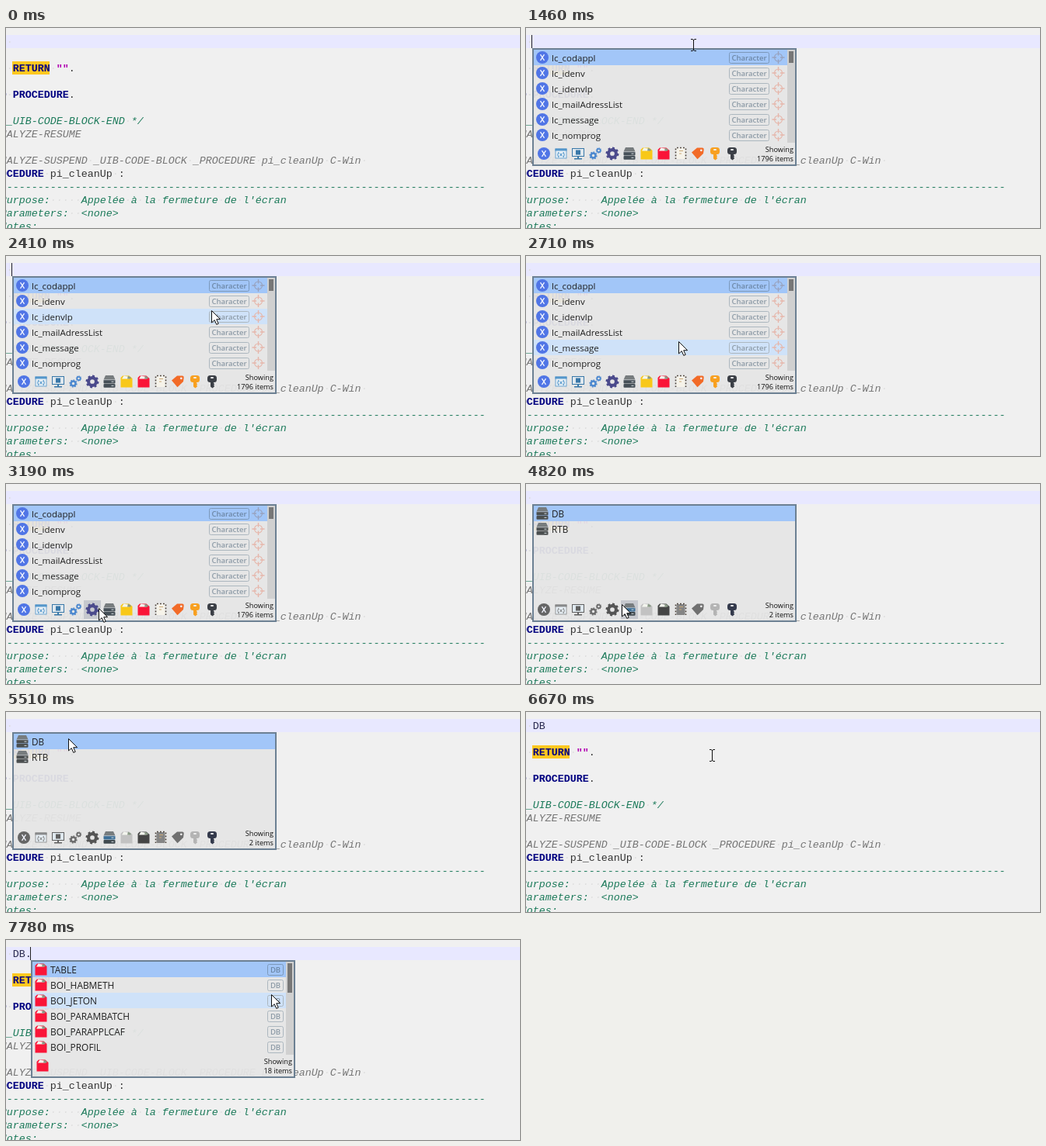
These frames come from a looping animation (661x258 px, 8 s). An HTML page:

```html
<!DOCTYPE html>
<html lang="fr">
<head>
<meta charset="utf-8">
<title>Code completion</title>
<style>
  html, body { margin: 0; width: 100%; height: 100%; overflow: hidden; background: #f0f0f0; }
  svg { display: block; }
  text { white-space: pre; }
  .code { font: 13.333px "Liberation Mono", monospace; fill: #333; }
  .key { font-weight: bold; fill: #000080; }
  .str { font-weight: bold; fill: #b000b0; }
  .com { font-style: italic; fill: #1c7a5a; }
  .pre { font-style: italic; fill: #757575; }
  .dot { fill: #dedede; }
  .item { font-family: "Open Sans", sans-serif; fill: #202020; }
  .count { font: 9.2px "Open Sans", sans-serif; fill: #101010; text-anchor: end; }
  .badge { font: 600 9.5px "Open Sans", sans-serif; fill: #8c9aa6; text-anchor: middle; }
</style>
</head>
<body>
<svg id="stage" width="661" height="258" viewBox="0 0 661 258"></svg>
<script>
const LOOP = 8000;
const stage = document.getElementById('stage');

const rect = (x, y, w, h, fill, more = '') =>
  `<rect x="${x}" y="${y}" width="${w}" height="${h}" fill="${fill}" ${more}/>`;
const path = (d, fill, more = '') => `<path d="${d}" fill="${fill}" ${more}/>`;
const line = (d, color, width = 1, more = '') =>
  path(d, 'none', `stroke="${color}" stroke-width="${width}" ${more}`);
const disc = (r, fill, more = '') => `<circle r="${r}" fill="${fill}" ${more}/>`;
const at = (x, y, body, more = '') => `<g transform="translate(${x} ${y})" ${more}>${body}</g>`;

// Editor: column 0 sits left of the stage
const dots = s => s.replace(/ /g, '<tspan class="dot">·</tspan>');
const code = (row, ...runs) => `<text class="code" x="-23.3" y="${22 + 17 * row}">` +
  runs.map(([cls, s]) => `<tspan class="${cls}">${dots(s)}</tspan>`).join('') + '</text>';

const editor =
  rect(0, 9, 661, 17, '#e8e8ff') +
  rect(8, 43, 48, 17, '#ffc820') +
  code(0, ['', '    ']) +
  code(2, ['', '    '], ['key', 'RETURN'], ['', ' '], ['str', '""'], ['', '.']) +
  code(4, ['key', 'END PROCEDURE'], ['', '.']) +
  code(6, ['com', '/* _UIB-CODE-BLOCK-END */']) +
  code(7, ['pre', '&amp;ANALYZE-RESUME']) +
  code(9, ['pre', '&amp;ANALYZE-SUSPEND _UIB-CODE-BLOCK _PROCEDURE pi_cleanUp C-Win ']) +
  code(10, ['key', 'PROCEDURE'], ['', ' pi_cleanUp :']) +
  code(11, ['com', '/*' + '-'.repeat(78)]) +
  code(12, ['com', "  Purpose:     Appelée à la fermeture de l'écran"]) +
  code(13, ['com', '  Parameters:  &lt;none&gt;']) +
  code(14, ['com', '  Notes:']);

// Icons, centred on 0,0; c is the main colour
const gear = (r, c) =>
  `<circle r="${r * .6}" fill="none" stroke="${c}" stroke-width="${r * .5}"/>` +
  `<circle r="${r * .88}" fill="none" stroke="${c}" stroke-width="${r * .3}" pathLength="16" stroke-dasharray="1"/>`;
const icon = {
  variable: c => disc(8, c) + line('M-2.5-3.8L2.5 3.8M2.5-3.8L-2.5 3.8', '#f4f6ff', 1.3),
  field: c => rect(-7, -6, 14, 12, '#e8f0f6', `stroke="${c}" stroke-opacity=".7"`) +
    rect(-7.5, -6.5, 15, 3, c, 'fill-opacity=".8"') +
    line('M-3-2Q-5.5 1.5-3 5M3-2Q5.5 1.5 3 5M-1.8-.5L1.8 3.5M1.8-.5L-1.8 3.5', c),
  screen: c => rect(-7.5, -6.5, 15, 10, '#dfe8ee', `stroke="${c}"`) +
    rect(-3, -4.5, 6, 6, c) + path('M-1 4H1V6H5V7.5H-5V6H-1Z', c),
  gears: c => at(-2.5, 2.5, gear(5, c)) + at(4.5, -4, gear(3.6, c)),
  gear: c => gear(8.2, c),
  drive: (c, mid = c) => path('M-5-8H5L7.5-2.5H-7.5Z', '#777c7e') + rect(-7.5, -2.2, 15, 4.6, mid, 'rx="1"') +
    rect(-7.5, 3, 15, 4.8, c, 'rx="1"') + line('M2.5 .2H5.5M2.5 5.4H5.5', '#d5dde0') +
    line('M-7-2.2H7', '#c9cfd1', .6),
  table: c => path('M-7.5-5L-5-7.5H3.5L7.5-4V7.5H-7.5Z', c) + path('M-3.5-7.5L4-6L3.5-3.5H-6Z', '#f3f5ee') +
    path('M2-7.5L6-5L5-3.5H1Z', '#8a9a86'),
  chip: c => rect(-5.5, -7, 11, 14, c, 'rx="1.5"') +
    line('M-6.5-6.5V7M6.5-6.5V7M-5-7.5H6', '#4a4038', 1.6, 'stroke-dasharray="1.8 2.2"') +
    line('M-2-3.5H3M-2 0H1', '#c9a878'),
  tag: c => path('M-8-1.5L-1-7.5H6Q8-7.5 7.7-5L7 0L-.5 7.2Z', c) +
    `<circle cx="4.3" cy="-4.2" r="1.4" fill="#f0f0f0"/>`,
  key: c => rect(-6, -8, 12, 9, c, 'rx="3.5"') + rect(-2, -6, 4, 2, '#eee', 'rx="1"') +
    path('M-2 0H2V2L3.2 3.3L2 4.5L3.2 6L.5 8.5L-2 6.5Z', c),
};
const target = c => disc(5, 'none', `stroke="${c}" stroke-width="1.1"`) +
  line('M0-8V-2.5M0 2.5V8M-8 0H-2.5M2.5 0H8', c, 1.4);

const tools = ['variable', 'field', 'screen', 'gears', 'gear', 'drive', 'table', 'table', 'chip', 'tag', 'key', 'key'];
const bright = ['#5075e6', '#3a87c4', '#3877a8', '#4c88cf', '#4b4a8c', '#465058', '#f8c818', '#fa1538', '#f6f3ea', '#f26b28', '#f8a020', '#3b3f46'];
const muted = ['#666', '#777', '#606060', '#6c6c6c', '#555', '#3f494f', '#c2c2c2', '#454545', '#858585', '#707070', '#b4b4b4', '#343a4c'];

// Completion popup; x0 is its left edge, the top edge is always 26
function popup(id, o) {
  const right = o.thumb ? 328 : 338;
  const rows = o.items.map((name, i) => {
    const y = 38 + 20 * i;
    let s = at(13, y, o.mark) + `<text class="item" font-size="${o.size}" x="25" y="${y + 4.5}">${name}</text>`;
    if (o.badge) {
      const [text, x, w] = o.badge;
      s += rect(x + .5, y - 6.5, w - 1, 14, 'none', `rx="2" stroke="${i ? '#acb7bf' : '#7c99ba'}"`) +
        `<text class="badge" x="${x + w / 2}" y="${y + 4}" ${i ? '' : 'style="fill:#6c87a6"'}>${text}</text>`;
    }
    if (o.target) s += at(316.5, y, target(i ? '#e6b6aa' : '#98a2be'));
    return s;
  }).join('');
  const scroll = o.thumb
    ? rect(328, 28, 10, 120, '#d0d0d0') + rect(330, 30, 6, o.thumb, '#777') : '';
  return at(o.x0, 0,
    rect(1, 27, 338, 150, '#e6e6e6', 'fill-opacity=".945" stroke="#6c8093" stroke-width="2"') +
    rect(2, 28, right - 2, 20, '#a2c6f8') +
    rect(2, 0, right - 2, 20, '#cfe2f9', 'class="rowHover"') +
    rect(0, 150, 22, 24, '#c6c8ce', 'class="toolHover"') +
    rows + scroll + o.bar +
    `<text class="count" x="336" y="160">Showing</text><text class="count" x="336" y="172">${o.count} items</text>`,
    `id="${id}"`);
}
const bar = (colors, mid) => tools.map((name, i) =>
  at(15 + 22 * i, 162, icon[name](colors[i], i === 5 ? mid : undefined))).join('');

const lists = {
  vars: { x0: 8, size: 11.5, count: 1796, thumb: 15, target: true, badge: ['Character', 253, 52],
    items: ['lc_codappl', 'lc_idenv', 'lc_idenvlp', 'lc_mailAdressList', 'lc_message', 'lc_nomprog'],
    mark: icon.variable(bright[0]), bar: bar(bright) },
  bases: { x0: 8, size: 11.7, count: 2, items: ['DB', 'RTB'],
    mark: icon.drive('#4b4f50'), bar: bar(muted, '#3c6e96') },
  tables: { x0: 32, size: 11.9, count: 18, thumb: 38, badge: ['DB', 304, 21],
    items: ['TABLE', 'BOI_HABMETH', 'BOI_JETON', 'BOI_PARAMBATCH', 'BOI_PARAPPLCAF', 'BOI_PROFIL'],
    mark: icon.table(bright[7]), bar: at(15, 162, icon.table(bright[7])) },
};

stage.innerHTML = rect(0, 0, 661, 258, '#f0f0f0') + editor +
  '<text id="typed" class="code" x="8.7" y="22" style="fill:#2b2b50"></text>' +
  rect(0, 9, 1, 17, '#222', 'id="caret"') +
  Object.entries(lists).map(([id, o]) => popup(id, o)).join('') +
  `<g id="beam">${line('M-3-7.5H-1L.5-6.5L2-7.5H4M.5-7V7M-3 7.5H-1L.5 6.5L2 7.5H4', '#111')}</g>` +
  `<g id="arrow">${path('M.5 .5V16L4.2 12.6L6.8 18.4L9.2 17.3L6.7 11.7H11.6Z', '#fff', 'stroke="#111"')}</g>`;

// Mouse: time, x, y
const moves = [
  [70, 455, 230], [680, 67, 15], [1000, 67, 15], [1150, 130, 12], [1440, 215, 22], [1560, 215, 22],
  [1760, 220, 24], [1840, 224, 29], [2160, 224, 29], [2400, 264, 70], [2490, 264, 70], [2960, 119, 156],
  [3030, 119, 160], [3250, 119, 160], [3420, 126, 161], [4120, 126, 161], [4200, 123, 155],
  [5150, 123, 155], [5510, 80, 34], [6440, 80, 34], [6820, 341, 70], [LOOP, 341, 70],
];
// Caret: each time flips it, starting hidden
const blinks = [830, 1080, 1330, 1600, 1840, 2160, 2400, 2650, 2960, 3190, 3420, 3720, 3950, 4200,
  4500, 4760, 6210, 6490, 6740, 7000, 7310, 7560, 7780];
// Which popup is open from when, and what has been typed
const opens = [[0, ''], [1250, 'vars'], [4680, 'bases'], [6210, ''], [7780, 'tables']];
const typing = [[0, ''], [6210, 'DB'], [7780, 'DB.']];

const current = (table, t) => table.filter(([from]) => t >= from).pop()[1];

function mouseAt(t) {
  const i = moves.findIndex(m => m[0] > t);
  const [t0, x0, y0] = moves[i - 1], [t1, x1, y1] = moves[i];
  const k = (t - t0) / (t1 - t0);
  return [Math.round(x0 + (x1 - x0) * k), Math.round(y0 + (y1 - y0) * k)];
}

const el = id => document.getElementById(id);
const show = (node, on) => node.style.display = on ? '' : 'none';

function hover(id, x, y) {
  const o = lists[id], node = el(id), row = Math.floor((y - 28) / 20);
  const tool = Math.floor((x - o.x0 - 4) / 22);
  const rowMark = node.querySelector('.rowHover'), toolMark = node.querySelector('.toolHover');
  rowMark.setAttribute('y', 28 + 20 * row);
  toolMark.setAttribute('x', 4 + 22 * tool);
  show(rowMark, row > 0 && row < o.items.length);
  show(toolMark, y >= 150 && y < 174 && tool >= 0 && tool < tools.length);
}

function draw(t) {
  const open = current(opens, t), typed = current(typing, t);
  for (const id in lists) show(el(id), id === open);
  el('typed').textContent = typed;
  el('caret').setAttribute('x', 7 + 8 * typed.length);
  show(el('caret'), blinks.filter(b => t >= b).length % 2);

  const visible = t >= moves[0][0];
  const [x, y] = visible ? mouseAt(t) : [0, 0];
  const x0 = open ? lists[open].x0 : 0;
  const inside = open && x >= x0 && x < x0 + 340 && y >= 26 && y < 178;
  if (open) hover(open, x, y);
  for (const id of ['beam', 'arrow']) {
    show(el(id), visible && (id === 'arrow') === Boolean(inside));
    el(id).setAttribute('transform', `translate(${x} ${y})`);
  }
}

function tick() {
  draw(performance.now() % LOOP);
  requestAnimationFrame(tick);
}
tick();
</script>
</body>
</html>
```
